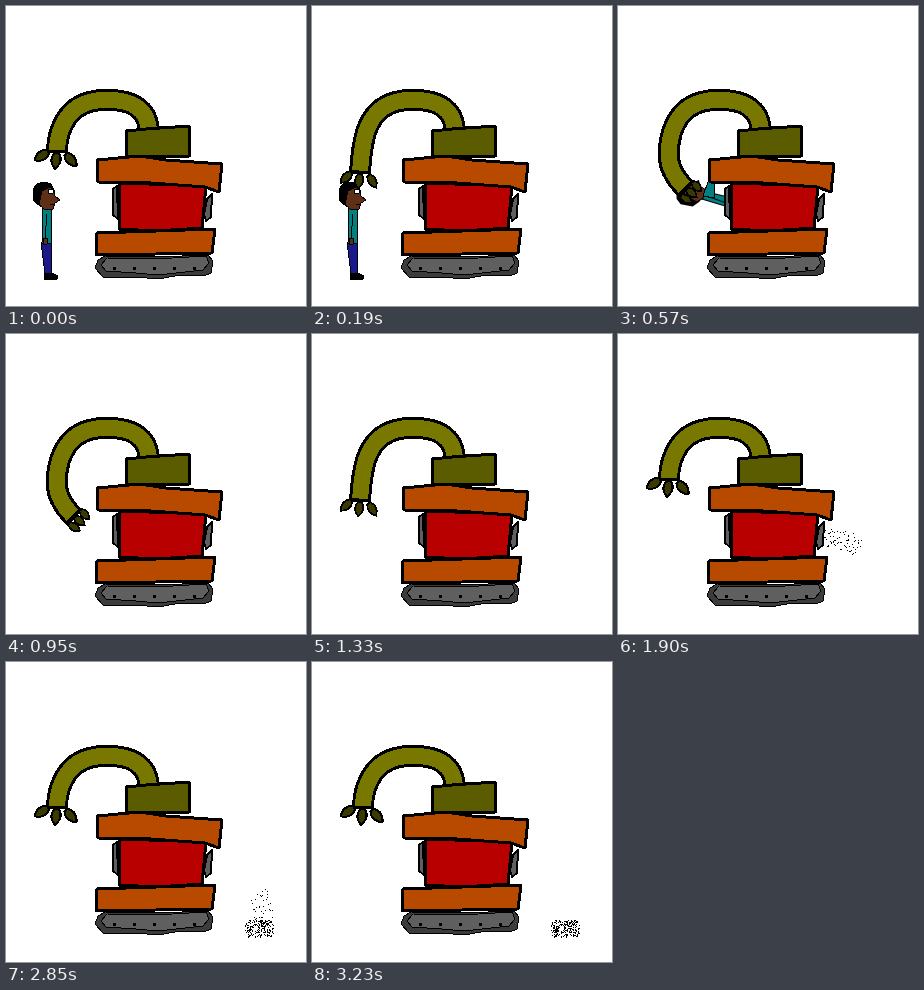
Write an HTML page that moves like this. It is 300 px wide and 300 px high and loops after 3420 ms.

```html
<!DOCTYPE html>
<html lang="en">
<head>
<meta charset="utf-8">
<title>Recycling machine</title>
<style>
  html, body { margin: 0; width: 100%; height: 100%; overflow: hidden; background: #fff; }
  svg { display: block; width: 100%; height: 100%; shape-rendering: crispEdges; }
  .ink { stroke: #000; stroke-width: 3; stroke-linejoin: round; }
  .thin { stroke: #000; stroke-width: 1; stroke-linejoin: round; }
  .arm { fill: none; stroke: #000; stroke-width: 22; }
  .arm.paint { stroke: #787800; stroke-width: 16; stroke-dasharray: 98 9; }
  .claw { fill: #3a3a00; stroke: #000; stroke-width: 2; stroke-linejoin: round; }
  .moss { fill: #5b5b00; }
  .rust { fill: #b84a00; }
  .red { fill: #b80000; }
  .steel { fill: #5f5f5f; }
  .rubber { fill: #3c3c3c; }
  .skin { fill: #5f3018; }
  .shirt { fill: #008080; }
  .jeans { fill: #1a1a8c; }
</style>
</head>
<body>
<svg viewBox="0 0 300 300">
  <defs>
    <clipPath id="inlet"><path d="M0 0H107V300H0Z"/></clipPath>
    <path id="claw" class="claw" d="M-2 0Q-8 8 0 16 8 8 2 0Z"/>
    <g id="man" class="thin">
      <path class="jeans" d="M35 236 45 236 46 268 39 268Z"/>
      <path d="M38 267 46 267 52 270 51 273 38 273Z"/>
      <path class="shirt" d="M37 202 45 203 46 237 36 237Z"/>
      <path d="M41 208 39 232" fill="none"/>
      <path class="skin" d="M37 232h4v6h-4Z"/>
      <path d="M27 183 31 178 38 176 45 178 48 184 40 200 34 200 28 195Z"/>
      <path class="skin" d="M36 185 44 181 48 184 49 190 54 194 49 197 47 203 38 203 33 198Z"/>
      <path d="M42 183h5v4h-5Z" fill="#fff"/>
      <path d="M44 198h4" fill="none"/>
    </g>
  </defs>

  <use id="standing" href="#man"/>
  <g clip-path="url(#inlet)">
    <g id="held" class="thin">
      <use href="#man" transform="translate(48 182) rotate(-75) translate(-40 -190)"/>
      <path class="shirt" d="M60 185 66 168 72 170 71 187Z"/>
      <path class="skin" d="M65 169 67 163 73 162 74 166 71 170Z"/>
    </g>
  </g>

  <path class="arm"/>
  <path class="arm paint" pathLength="100"/>
  <g id="claws"></g>

  <g class="ink">
    <path class="moss" d="M120 125 140 123 183 120 184 150 121 151Z"/>
    <path class="red" d="M114 177 200 180 196 222 150 225 113 223Z"/>
    <path class="rust" d="M91 154 134 150 160 154 216 158 213 186 199 181 145 177 92 176Z"/>
    <path class="rust" d="M91 227 150 225 209 223 206 247 150 248 90 249Z"/>
  </g>
  <g class="thin">
    <path class="steel ink" style="stroke-width:2" d="M107 183 111 180 112 213 107 209ZM201 193 206 188 205 211 200 215 198 208Z"/>
    <path class="rubber" d="M89 262 92 254 99 250 150 251 202 249 207 255 205 267 198 270 175 269 152 273 130 271 97 271Z"/>
    <path class="steel" d="M95 259 101 252 150 253 200 250 203 257 197 264 152 269 130 267 100 265Z"/>
  </g>
  <path d="M107 262H192" stroke="#000" stroke-width="3" stroke-dasharray="3 17"/>
  <path id="dust"/>
</svg>
<script>
  const STEP = 190, COUNT = 18, DUST_START = 9;
  const $ = id => document.getElementById(id);
  const clamp = v => Math.min(1, Math.max(0, v));

  // The arm is one thick stroke; a pose bends its end and fans out three claws.
  const shoulder = 'M143 124C141 102 125 94 103 94C76 93 61 105 54 126';
  const poses = {
    rest: { bend: 'Q51 135 51 147', tip: '51 147', heading: 8, spread: 50, size: 1 },
    open: { bend: 'Q49 144 48 168', tip: '48 168', heading: 8, spread: 38, size: .9 },
    grip: { bend: 'Q50 140 51 162', tip: '51 162', heading: 0, spread: 0, size: 1 },
    reach: { bend: 'C49 145 46 162 69 184', tip: '69 183', heading: -50, spread: -8, size: .8 },
    release: { bend: 'C49 145 46 162 69 184', tip: '69 183', heading: -45, spread: 50, size: 1 }
  };
  const sequence = ['rest', 'open', 'grip', 'reach', 'release', 'reach', 'grip', 'open'];

  function drawArm({ bend, tip, heading, spread, size }) {
    for (const path of document.querySelectorAll('.arm')) path.setAttribute('d', shoulder + bend);
    $('claws').innerHTML = [1, 0, -1].map(side =>
      `<use href="#claw" transform="translate(${tip}) rotate(${heading}) translate(${-9 * side} 0)
        rotate(${side * spread}) scale(${size})"/>`).join('');
  }

  function random(seed) {
    return () => (seed = (seed * 16807) % 2147483647) / 2147483647;
  }

  const dot = (x, y) => `M${Math.floor(x)} ${Math.floor(y)}h1v1h-1Z`;

  // Dust falls along a quadratic curve, redrawn each step, and leaves a growing heap.
  function dustPath(step) {
    if (step < 0) return '';
    let d = '';
    const head = clamp(.12 + .3 * step), tail = clamp((step - 3.4) / 4.2);
    const flow = random(9173 + step * 3571);
    for (let n = Math.round((head - tail) * 165); n > 0; n--) {
      const u = tail + (head - tail) * flow(), v = 1 - u;
      const dx = 104 * v, dy = 4 * v + 134 * u;
      const off = (flow() * 2 - 1) * 10 / Math.hypot(dx, dy);
      d += dot(v * v * 207 + (1 - v * v) * 259 - dy * off,
               v * v * 203 + 2 * u * v * 205 + u * u * 272 + dx * off);
    }
    const heap = random(48271);
    for (let n = clamp((step - 2.6) / 4.4) * 250; n > 0; n--) {
      const y = heap() * 2 - 1;
      d += dot(253.5 + (heap() * 2 - 1) * (15 - 4 * y * y), 267 + y * 8.5);
    }
    return d;
  }

  function draw(frame) {
    drawArm(poses[sequence[frame] || 'rest']);
    const carried = frame - 2;
    $('standing').style.display = carried < 0 ? '' : 'none';
    $('held').style.display = carried >= 0 && carried < 3 ? '' : 'none';
    $('held').setAttribute('transform', `translate(${carried * 25} ${carried * 5})`);
    $('dust').setAttribute('d', dustPath(frame - DUST_START));
  }

  const start = performance.now();
  let shown = -1;
  function tick() {
    const frame = Math.floor((performance.now() - start) / STEP) % COUNT;
    if (frame !== shown) draw(shown = frame);
    requestAnimationFrame(tick);
  }
  tick();
</script>
</body>
</html>
```
